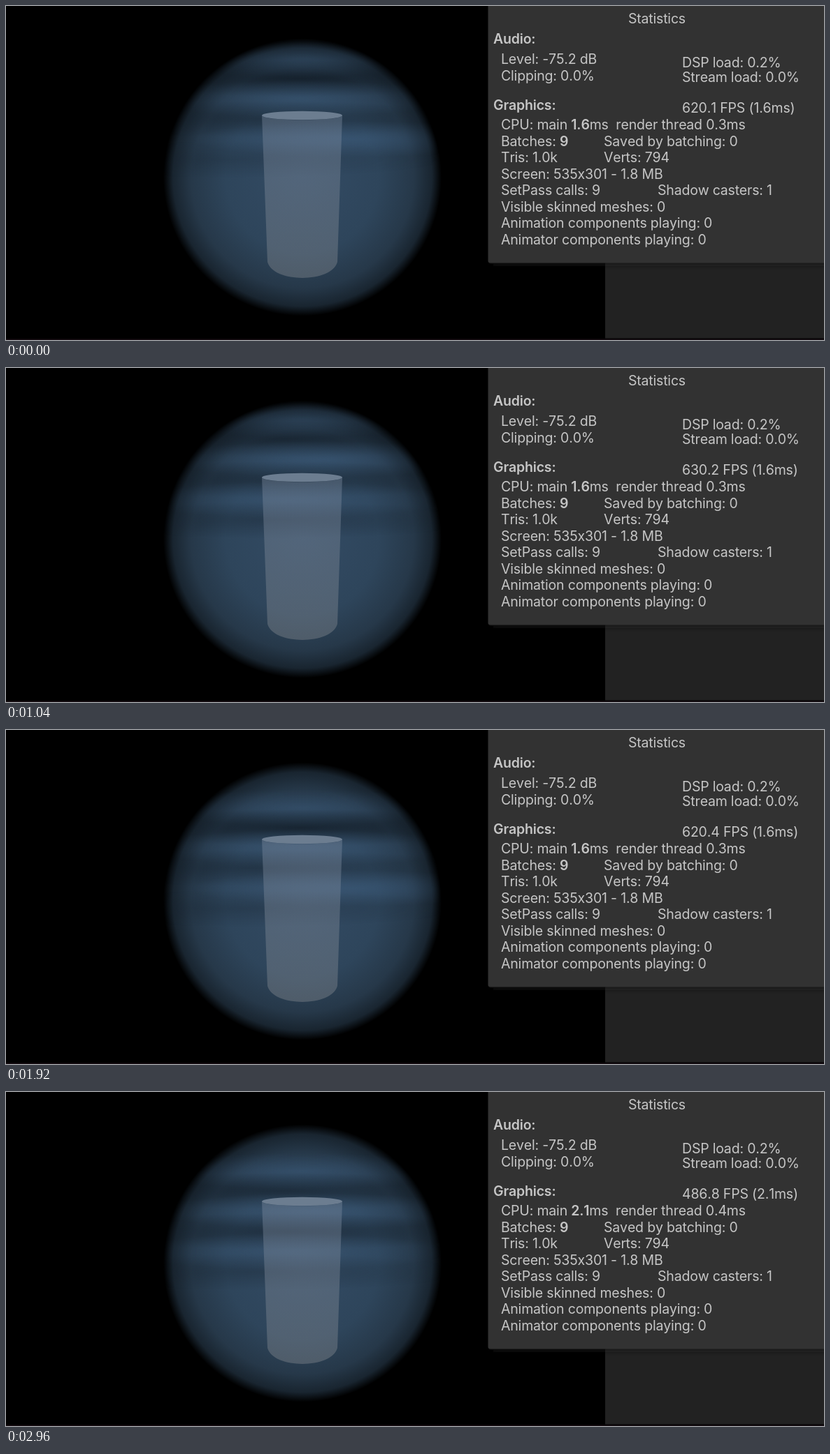
Animation of 1170x479 px, one loop 3040 ms. Source, as an HTML page:

```html
<!DOCTYPE html>
<html lang="en">
<head>
<meta charset="utf-8">
<title>Volumetric fog statistics</title>
<style>
  html, body { margin: 0; width: 100%; height: 100%; overflow: hidden; background: #000; }
  svg { display: block; width: 100vw; height: 100vh; }
  text {
    font: 19.5px Inter, Roboto, sans-serif;
    font-kerning: none;
    font-optical-sizing: none;
    font-feature-settings: "calt" 0;
    letter-spacing: -0.18px;
    fill: #c6c6c6;
    white-space: pre;
  }
  .bold { font-weight: 600; }
</style>
</head>
<body>
<svg viewBox="0 0 1170 479" xmlns="http://www.w3.org/2000/svg">
  <defs>
    <radialGradient id="ball">
      <stop offset="0" stop-color="#334b64"/>
      <stop offset=".55" stop-color="#2e455b"/>
      <stop offset=".8" stop-color="#263849"/>
      <stop offset=".93" stop-color="#192530"/>
      <stop offset="1" stop-color="#000"/>
    </radialGradient>
    <radialGradient id="rim">
      <stop offset=".75" stop-color="#fff"/>
      <stop offset=".95" stop-color="#777"/>
      <stop offset="1" stop-color="#000"/>
    </radialGradient>
    <radialGradient id="light">
      <stop offset="0" stop-color="#3e5e7f"/>
      <stop offset=".5" stop-color="#3e5e7f" stop-opacity=".5"/>
      <stop offset="1" stop-color="#3e5e7f" stop-opacity="0"/>
    </radialGradient>
    <radialGradient id="dark">
      <stop offset="0" stop-color="#0a1118"/>
      <stop offset=".5" stop-color="#0a1118" stop-opacity=".5"/>
      <stop offset="1" stop-color="#0a1118" stop-opacity="0"/>
    </radialGradient>
    <linearGradient id="glass" x2="0" y2="1">
      <stop offset="0" stop-color="#7d8da3" stop-opacity=".4"/>
      <stop offset="1" stop-color="#7c8289" stop-opacity=".46"/>
    </linearGradient>
    <mask id="round"><circle cx="424" cy="245.5" r="199" fill="url(#rim)"/></mask>
    <filter id="soft" x="-10%" y="-10%" width="120%" height="120%"><feGaussianBlur stdDeviation="4"/></filter>
  </defs>

  <rect width="1170" height="479" fill="#000"/>
  <circle cx="424" cy="245.5" r="199" fill="url(#ball)"/>
  <g id="fog" mask="url(#round)"></g>

  <path d="M366 157 L374 367 C382 397.500 466 397.500 474 367 L481 157 A57.500 6.500 0 0 1 366 157 Z" fill="url(#glass)"/>
  <ellipse cx="423.500" cy="157" rx="57.500" ry="6.300" fill="#6c7d90"/>

  <rect x="857" y="360" width="313" height="116.500" fill="#222"/>
  <rect y="477.500" width="1170" height="1.500" fill="#160d12"/>
  <rect x="694" y="-20" width="500" height="390" fill="#181818" filter="url(#soft)"/>
  <rect x="689.500" y="-10" width="490" height="378.500" rx="3" fill="#323232"/>
  <g id="labels"></g>
</svg>
<script>
const NS = "http://www.w3.org/2000/svg";
const LOOP = 3040, STEP = 80;
const fog = document.getElementById("fog");
const labels = document.getElementById("labels");

function add(parent, tag, attrs) {
  const el = document.createElementNS(NS, tag);
  for (const name in attrs) el.setAttribute(name, attrs[name]);
  return parent.appendChild(el);
}

// Parts between asterisks are bold.
function write(el, text) {
  el.replaceChildren();
  text.split("*").forEach((part, i) => {
    add(el, "tspan", { class: i % 2 ? "bold" : "" }).textContent = part;
  });
}

function label(x, y, text = "") {
  const el = add(labels, "text", { x, y });
  write(el, text);
  return el;
}

function column(x, top, lines, pitch = 23.5) {
  return lines.map((line, i) => label(x, top + i * pitch, line));
}

label(890, 24.5, "Statistics");
label(697, 54, "*Audio:*");
label(697, 148.5, "*Graphics:*");
column(708, 83, ["Level: -75.2 dB", "Clipping: 0.0%"]);
const [dsp] = column(967, 88, ["", "Stream load: 0.0%"], 21);
const fps = label(967, 153);
const [cpu] = column(708, 177, [
  "",
  "Batches: *9*",
  "Tris: 1.0k",
  "Screen: 535x301 - 1.8 MB",
  "SetPass calls: 9",
  "Visible skinned meshes: 0",
  "Animation components playing: 0",
  "Animator components playing: 0"
]);
column(855, 200.5, ["Saved by batching: 0", "Verts: 794"]);
label(932, 271, "Shadow casters: 1");

// Readings, with the height of the main dark fog band
const keys = [
  { t: 0, rate: 620.1, load: 0.2, y: 104 },
  { t: 640, rate: 620.9, load: 0.2, y: 121 },
  { t: 1040, rate: 630.2, load: 0.2, y: 102 },
  { t: 1520, rate: 630.3, load: 0.2, y: 157 },
  { t: 1920, rate: 620.4, load: 0.2, y: 140 },
  { t: 2320, rate: 618.6, load: 0.3, y: 125 },
  { t: 2960, rate: 486.8, load: 0.2, y: 142 }
];

// Light and dark bands alternate down the sphere.
const bands = Array.from({ length: 6 }, (_, i) => {
  const dark = i % 2 === 1;
  const el = add(fog, "ellipse", {
    rx: dark ? 310 : 230,
    ry: 26,
    fill: `url(#${dark ? "dark" : "light"})`
  });
  return { el, dark };
});

function drawFog(t, key, next) {
  const y = key.y + (next.y - key.y) * (t - key.t) / (next.t - key.t || 1);
  bands.forEach(({ el, dark }, i) => {
    const sway = Math.sin(t / 330 + i * 2);
    const depth = i / bands.length;
    el.setAttribute("cx", 424 + depth * (dark ? -90 : 40) + depth * 70 * sway);
    el.setAttribute("cy", y + (i - 1) * 29);
    el.setAttribute("opacity", (dark ? 0.62 - 0.5 * depth : 0.45) + 0.08 * sway);
  });
}

function drawReadings({ rate, load }) {
  const ms = 1000 / rate;
  const main = ms.toFixed(1);
  write(dsp, `DSP load: ${load}%`);
  write(fps, `${rate} FPS (${main}ms)`);
  write(cpu, `CPU: main *${main}*ms  render thread ${(ms / 5).toFixed(1)}ms`);
}

function draw(now) {
  const t = Math.floor(now % LOOP / STEP) * STEP;
  const k = keys.findLastIndex(key => key.t <= t);
  drawFog(t, keys[k], keys[k + 1] || keys[k]);
  drawReadings(keys[k]);
}

const start = performance.now();
function tick() {
  draw(performance.now() - start);
  requestAnimationFrame(tick);
}
tick();
</script>
</body>
</html>
```
